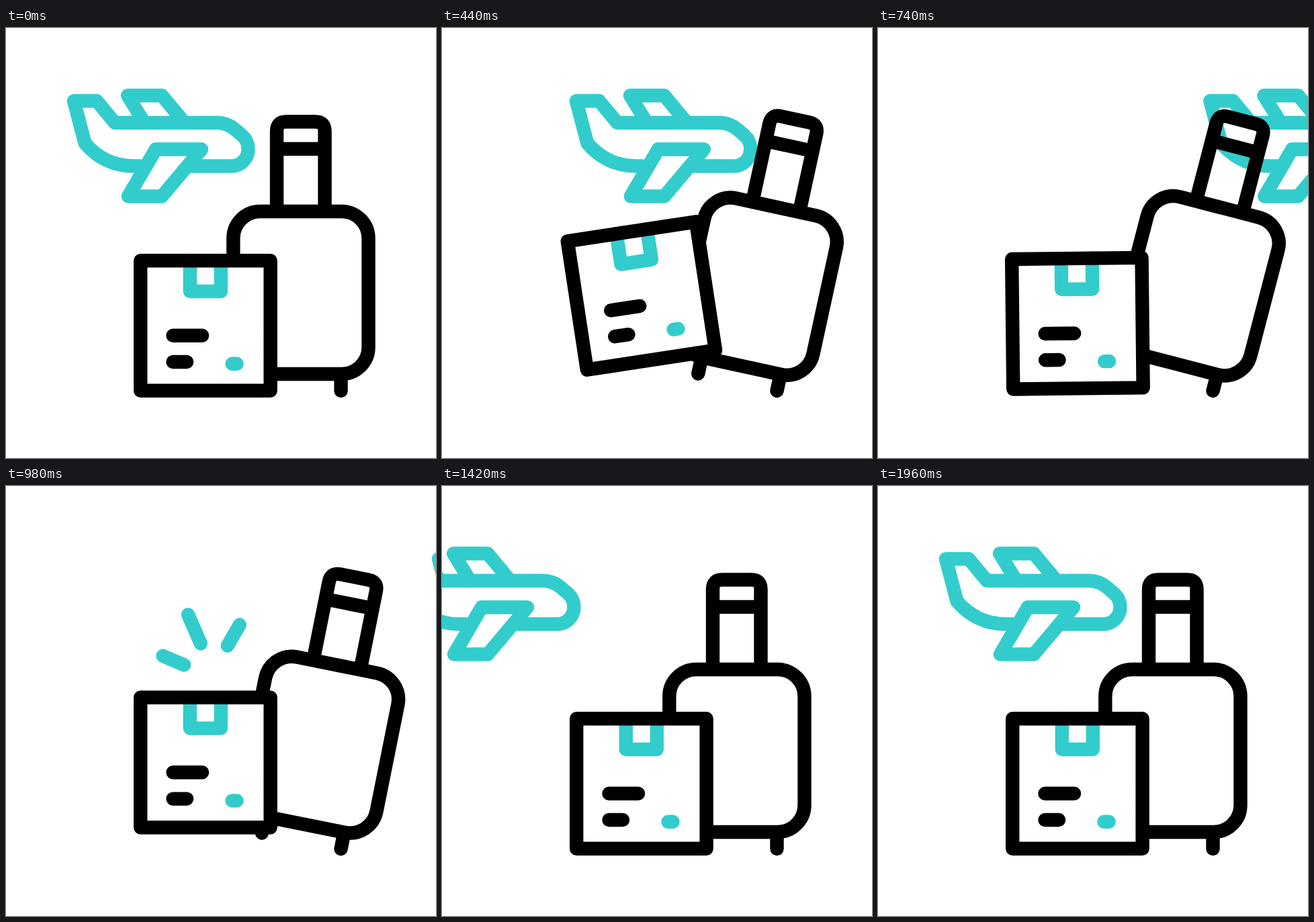
Recreate the animation shown at these times as an HTML page. Size 640 by 640 pixels, loop 2400 ms.

```html
<!DOCTYPE html>
<html lang="en">
<head>
<meta charset="utf-8">
<title>Luggage delivery</title>
<style>
  html, body { margin: 0; width: 100%; height: 100%; overflow: hidden; background: #fff; }
  svg { display: block; width: 100vw; height: 100vh; }
  g { fill: none; stroke: #000; stroke-width: 20.4; stroke-linecap: round; stroke-linejoin: round; }
  .teal { stroke: #33cccc; }
</style>
</head>
<body>
<svg viewBox="0 0 640 640">
  <g id="plane" class="teal">
    <path d="M200 205.5H190C160 205.5 136 193 117.5 171.5L101 108.5H135L162 141H314C325 141 334 145 341 151L352 160.5C358 166 360.5 173 360.5 180.5A25 25 0 0 1 335.5 205.5H276"/>
    <path d="M206 141L181 100.5H232L264 139"/>
    <path d="M223 180.5H291L232 250.5H182Z"/>
  </g>
  <g id="sparks" class="teal"></g>
  <g id="suitcase">
    <path d="M403 273V153.5Q403 139.5 417 139.5H460.5Q474.5 139.5 474.5 153.5V273M403 180H474.5"/>
    <path d="M378.5 515V540M498.5 515V540"/>
    <rect x="338.3" y="273" width="201.2" height="242" rx="40" fill="#fff"/>
  </g>
  <g id="parcel">
    <path d="M200.2 346.2H393.6V539.7H200.2Z" fill="#fff" stroke="none"/>
    <path class="teal" d="M273.8 346V392H319.8V346M336.5 499.8H343.5"/>
    <path d="M200.2 346.2H393.6V539.7H200.2ZM248.5 457.7H292M248.5 497H269"/>
  </g>
</svg>
<script>
const LOOP = 2400;
const $ = id => document.getElementById(id);
const clamp = x => Math.min(1, Math.max(0, x));
const span = (t, a, b) => clamp((t - a) / (b - a));
const smooth = u => u * u * (3 - 2 * u);
const ramp = (t, a, b) => smooth(span(t, a, b));

// Bezier easing with flat ends: handles at (x1, 0) and (x2, 1).
function ease(x, x1, x2) {
  let lo = 0, hi = 1;
  for (let i = 0; i < 24; i++) {
    const q = (lo + hi) / 2, r = 1 - q;
    if (3 * r * r * q * x1 + 3 * r * q * q * x2 + q * q * q < x) lo = q; else hi = q;
  }
  return smooth((lo + hi) / 2);
}

// Each spark: inner x, inner y, outer x, outer y.
const sparks = [
  [265.5, 266.5, 205, 240.5],
  [290, 235, 254, 152.5],
  [329.5, 238, 364, 178.5]
].map(ends => {
  const el = document.createElementNS("http://www.w3.org/2000/svg", "path");
  $("sparks").append(el);
  return { el, ends };
});

function planeX(t) {
  return t < 1080
    ? 555 * ease(span(t, 0, 1100), 0.686, 0.54)
    : -371 * (1 - ease(span(t, 1060, 1960), 0.42, 0.25));
}

function drawSparks(t) {
  const head = 1 - (1 - span(t, 802, 1252)) ** 2;
  const tail = ramp(t, 845, 1276);
  const visible = head > 0 && tail < 1;
  for (const { el, ends: [x0, y0, x1, y1] } of sparks) {
    const at = p => {
      const s = 1.3 * p - 0.3;
      return `${x0 + (x1 - x0) * s} ${y0 + (y1 - y0) * s}`;
    };
    el.setAttribute("d", visible ? `M${at(tail)}L${at(head)}` : "");
  }
}

function draw(t) {
  $("plane").setAttribute("transform", `translate(${planeX(t)})`);

  const tilt = 14.6 * (ramp(t, 0, 590) - ramp(t, 800, 1390));
  $("suitcase").setAttribute("transform", `rotate(${tilt} 498.5 540)`);

  const toss = ramp(t, 0, 580) - ramp(t, 580, 770);
  const bounce = ramp(t, 770, 975) - ramp(t, 975, 1180);
  const y = -52 * toss - 31.5 * bounce;
  $("parcel").setAttribute("transform", `translate(0 ${y}) rotate(${-10.1 * toss} 297 443)`);

  drawSparks(t);
}

const start = performance.now();
function tick() {
  draw((performance.now() - start) % LOOP);
  requestAnimationFrame(tick);
}
tick();
</script>
</body>
</html>
```
